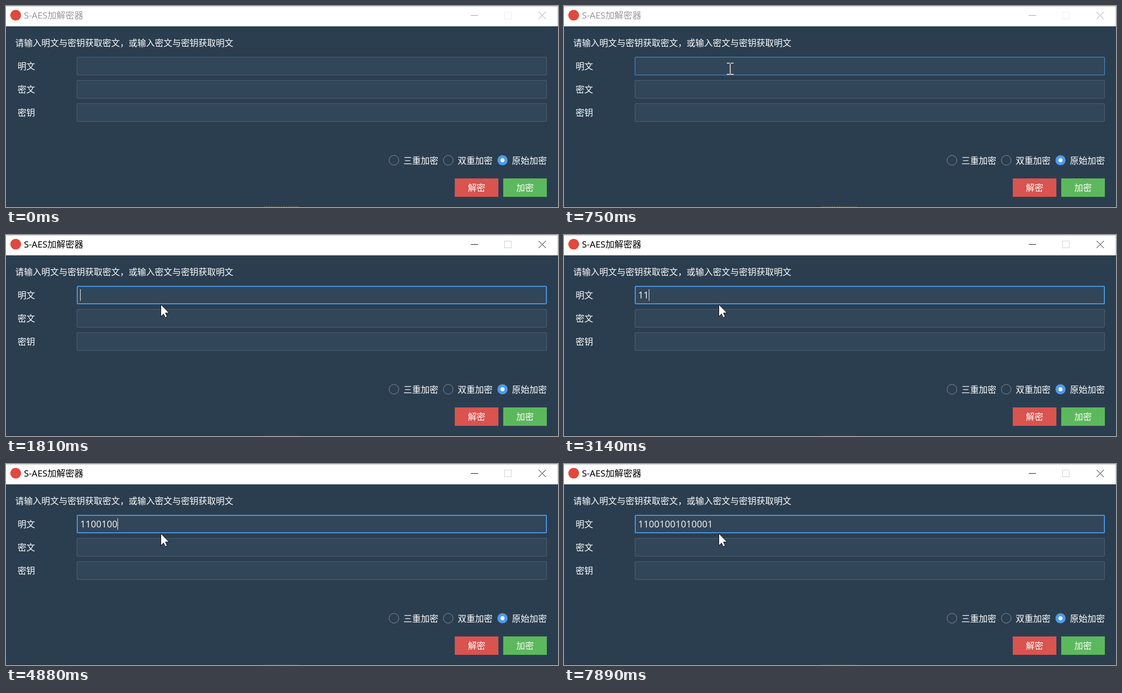
An HTML page with a canvas that plays this animation: 1139 by 415 pixels, repeating every 8 s.

```html
<!DOCTYPE html>
<html lang="zh-CN">
<head>
<meta charset="utf-8">
<title>S-AES加解密器</title>
<style>
  html, body { margin: 0; width: 100%; height: 100%; overflow: hidden; background: #2b3e50; }
  canvas { display: block; }
</style>
</head>
<body>
<canvas id="stage" width="1139" height="415"></canvas>
<script>
const ctx = document.getElementById('stage').getContext('2d', { alpha: false });
const LOOP = 8000;
const ENTER_TIME = 190;
const FOCUS_TIME = 880;
const CJK = '"Noto Sans CJK SC", "Noto Sans CJK", sans-serif';
const LATIN = '"Noto Sans", "Open Sans", ' + CJK;
const BLUE = '#4c9be8';

const FIELD = { x: 146, y: 105, w: 970, h: 38, gap: 48 };
const FIELD_LABELS = ['明文', '密文', '密钥'];
const RADIO_LABELS = ['三重加密', '双重加密', '原始加密'];
const PLAINTEXT = '11001001010001';
const DIGIT_WIDTH = 11;

// Typing pace: number of digits entered by a given time, even in between.
const PACE = [[2540, 1], [3140, 2], [4880, 7], [5490, 9], [6560, 11], [7760, 14]];
const BLINK = { start: 875, period: 916, visible: 600 };

const mix = (a, b, u) => a + (b - a) * u;
const easeIn = (u, power) => u ** power;
const easeOut = (u, power) => 1 - (1 - u) ** power;

// Progress from 0 to 1 in equal held steps.
function stepped(t, start, duration, steps) {
  const step = Math.floor((t - start) * steps / duration);
  return Math.min(Math.max(step / steps, 0), 1);
}

function typedCount(t) {
  if (t < PACE[0][0]) return 0;
  const next = PACE.findIndex(([time]) => time > t);
  if (next < 0) return PLAINTEXT.length;
  const [t0, n0] = PACE[next - 1];
  const [t1, n1] = PACE[next];
  return Math.floor(mix(n0, n1, (t - t0) / (t1 - t0)));
}

function pointerAt(t) {
  if (t < ENTER_TIME) return null;
  const approach = stepped(t, ENTER_TIME, 560, 7);
  const leave = stepped(t, FOCUS_TIME, 340, 5);
  return {
    x: Math.round(mix(976, 343, easeOut(approach, 2.2)) - 24 * easeIn(leave, 1.75)),
    y: Math.round(mix(393, 130, easeOut(approach, 2.9)) + 13 * easeOut(leave, 1.8))
  };
}

function hoveredField(pointer) {
  if (!pointer || pointer.x < FIELD.x || pointer.x >= FIELD.x + FIELD.w) return -1;
  const offset = pointer.y - FIELD.y;
  const row = Math.floor(offset / FIELD.gap);
  return row < FIELD_LABELS.length && offset - row * FIELD.gap < FIELD.h ? row : -1;
}

function box(x, y, w, h, color) {
  ctx.fillStyle = color;
  ctx.fillRect(x, y, w, h);
}

function text(str, x, y, { size = 18, color = '#fff', family = CJK, align = 'left' } = {}) {
  ctx.font = `${size}px ${family}`;
  ctx.textAlign = align;
  ctx.fillStyle = color;
  ctx.fillText(str, x, y);
}

function line(x1, y1, x2, y2, color) {
  ctx.beginPath();
  ctx.moveTo(x1, y1);
  ctx.lineTo(x2, y2);
  ctx.strokeStyle = color;
  ctx.lineWidth = 1;
  ctx.stroke();
}

function circle(x, y, r, fill, stroke) {
  ctx.beginPath();
  ctx.arc(x, y, r, 0, Math.PI * 2);
  if (fill) {
    ctx.fillStyle = fill;
    ctx.fill();
  }
  if (stroke) {
    ctx.strokeStyle = stroke;
    ctx.lineWidth = 1;
    ctx.stroke();
  }
}

function drawTitleBar(active) {
  const ink = active ? '#000' : '#999';
  box(0, 0, 1139, 42, '#fff');
  box(0, 0, 1139, 1, '#bcbcbc');
  box(1138, 0, 1, 42, '#c8c8c8');
  circle(20, 19, 11, '#e0493d');
  text('S-AES加解密器', 37, 26, { size: 18.5, color: ink, family: LATIN });
  box(959, 19, 15, 1, ink);
  ctx.strokeStyle = active ? '#ccc' : '#ebebeb';
  ctx.lineWidth = 1;
  ctx.strokeRect(1028.5, 12.5, 14, 14);
  line(1099, 12, 1114, 27, ink);
  line(1114, 12, 1099, 27, ink);
}

function drawField(label, row, focused, hovered) {
  const y = FIELD.y + row * FIELD.gap;
  const width = focused ? 2 : 1;
  text(label, 24, y + 26);
  ctx.beginPath();
  ctx.roundRect(FIELD.x + width / 2, y + width / 2, FIELD.w - width, FIELD.h - width, 1.5);
  ctx.fillStyle = '#32465a';
  ctx.fill();
  ctx.strokeStyle = focused || hovered ? BLUE : '#516170';
  ctx.lineWidth = width;
  ctx.stroke();
}

function drawRadio(label, i) {
  const x = 800.5 + i * 112;
  const y = 318.5;
  if (i === RADIO_LABELS.length - 1) {
    circle(x, y, 10.5, BLUE);
    circle(x, y, 4.2, '#fff');
  } else {
    circle(x, y, 10, null, '#8a96a1');
  }
  text(label, x + 19.5, 326);
}

function drawButton(label, x, color) {
  box(x, 356, 90, 38, color);
  text(label, x + 45, 382, { align: 'center' });
}

function drawBottomEdge(active) {
  box(0, 414, 1139, 1, '#2c3035');
  ctx.setLineDash([3, 2]);
  line(532, 414.5, 604, 414.5, active ? '#3c5544' : '#8a7044');
  ctx.setLineDash([]);
}

function drawTyping(t) {
  const count = typedCount(t);
  text(PLAINTEXT.slice(0, count), 153, 131, { size: 19.23, color: '#ebebeb', family: LATIN });
  const phase = (t - BLINK.start) % BLINK.period;
  if (t >= FOCUS_TIME && phase < BLINK.visible) {
    box(153 + DIGIT_WIDTH * count, 112, 1, 24, '#fff');
  }
}

function drawIBeam({ x, y }) {
  const color = '#d3cabd';
  box(x - 1, y - 11, 2, 22, color);
  for (const edge of [y - 13, y + 10]) {
    box(x - 7, edge, 6, 2, color);
    box(x + 1, edge, 6, 2, color);
  }
}

function drawArrow({ x, y }) {
  const outline = [[0, 0], [0, 25], [5.5, 19.5], [9, 27], [13, 25], [9.5, 17.5], [17, 17.5]];
  ctx.beginPath();
  outline.forEach(([dx, dy]) => ctx.lineTo(x + dx + 0.5, y + dy + 0.5));
  ctx.closePath();
  ctx.fillStyle = '#fff';
  ctx.fill();
  ctx.strokeStyle = '#000';
  ctx.lineWidth = 1;
  ctx.stroke();
}

function draw(t) {
  const active = t >= FOCUS_TIME;
  const pointer = pointerAt(t);
  const hovered = hoveredField(pointer);

  box(0, 0, 1139, 415, '#2b3e50');
  drawTitleBar(active);
  text('请输入明文与密钥获取密文，或输入密文与密钥获取明文', 19, 83);
  FIELD_LABELS.forEach((label, row) => drawField(label, row, active && row === 0, row === hovered));
  RADIO_LABELS.forEach(drawRadio);
  drawButton('解密', 926, '#d9534f');
  drawButton('加密', 1026, '#5cb85c');
  drawBottomEdge(active);
  drawTyping(t);
  if (pointer) (hovered >= 0 ? drawIBeam : drawArrow)(pointer);
}

const start = performance.now();
function tick() {
  draw((performance.now() - start) % LOOP);
  requestAnimationFrame(tick);
}
tick();
</script>
</body>
</html>
```
